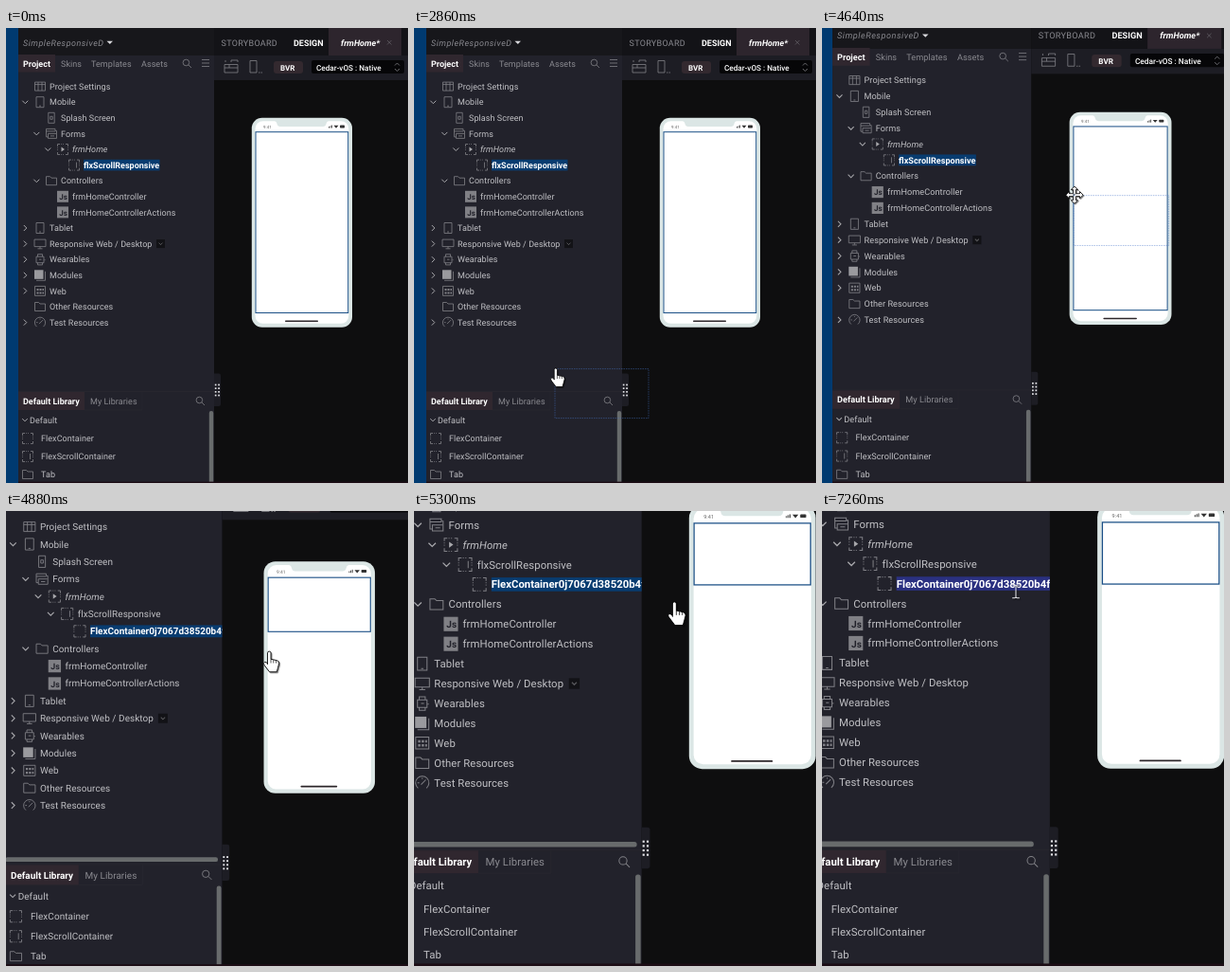
An HTML page for the animation above (8 s loop, 425 px wide and 480 px high).

```html
<!DOCTYPE html>
<html lang="en">
<head>
<meta charset="utf-8">
<title>Dragging a container onto a form</title>
<style>
html, body { margin: 0; width: 100%; height: 100%; overflow: hidden; background: #0e0e0f; }
svg { display: block; width: 425px; height: 480px; }
text { font: 9px Roboto, Arial, sans-serif; letter-spacing: .06px; fill: #c0c0c4; white-space: pre; text-rendering: geometricPrecision; }
.dim { fill: #8a8a90; }
.b { font-weight: 700; fill: #fff; letter-spacing: 0; }
.i { font-style: italic; }
.wide { letter-spacing: .3px; }
.title { letter-spacing: .5px; }
.small { font-size: 8px; }
.line { fill: none; stroke: #808086; stroke-width: .8; }
.chev { fill: none; stroke: #a8a8ac; stroke-width: 1; }
.cursor { fill: #fff; stroke: #000; stroke-width: .8; stroke-linejoin: round; }
#pointer { filter: drop-shadow(1px 1px .6px #0007); }
</style>
</head>
<body>
<svg viewBox="0 0 425 480"><g id="scene"></g></svg>
<script>
const $ = id => document.getElementById(id);
const rect = (x, y, w, h, fill, more = '') => `<rect x="${x}" y="${y}" width="${w}" height="${h}" fill="${fill}" ${more}/>`;
const path = (d, cls = 'line', more = '') => `<path d="${d}" class="${cls}" ${more}/>`;
const text = (x, y, s, cls = '', more = '') => `<text x="${x}" y="${y + 3.2}" class="${cls}" ${more}>${s}</text>`;
const group = (id, body, more = '') => `<g id="${id}" ${more}>${body}</g>`;
const at = (x, y, body) => `<g transform="translate(${x} ${y})">${body}</g>`;
const down = (x, y, r = 3) => path(`M${x - r} ${y - r / 2}l${r} ${r}l${r} ${-r}`, 'chev');
const right = (x, y) => path(`M${x - 1.5} ${y - 3}l3 3l-3 3`, 'chev');
const search = (x, y) => path(`M${x + 2} ${y + 2}l3 3M${x + 2.7} ${y - .5}a3.3 3.3 0 1 1-6.6 0a3.3 3.3 0 1 1 6.6 0`);

const dashed = path('M-5.5-3V-5.5H-3M3-5.5H5.5V-3M5.5 3V5.5H3M-3 5.5H-5.5V3')
  + path('M-2-5.5H2M-2 5.5H2M-5.5-2V2M5.5-2V2', 'line', 'stroke-dasharray="1 1" opacity=".8"');
const icons = {
  settings: path('M-5.5-4.5H5.5V4.5H-5.5ZM-2-4.5V4.5M2-4.5V4.5M-5.5-2H5.5'),
  phone: path('M-4-5.5H4V5.5H-4ZM-1 4H1'),
  splash: path('M-3.2-5.5H3.2V5.5H-3.2ZM-1.2-1.5H1.2V1.5H-1.2Z'),
  forms: path('M-5.5-5H4V-3H5.5V5H-3.5V3.5H-5.5ZM-5.5-2.5H4M-3.5 3.5V0H5M-1 2.5H3'),
  form: dashed + path('M-1.5-2.5L2 0L-1.5 2.5Z', '', 'fill="#a8a8ac"'),
  flex: dashed,
  scroll: dashed + path('M2.5-3V3'),
  folder: path('M-5.5-4.5H-1.5L0-3H5.5V4.5H-5.5Z'),
  js: rect(-6, -6, 12, 12, '#808085') + '<text x="-3.8" y="3.2" style="font:700 8px Roboto,sans-serif;fill:#22222b">Js</text>',
  desktop: path('M-6-4.5H6V3H-6ZM-2.5 5.2H2.5M0 3V5'),
  watch: path('M-4-3H4V3.5H-4ZM-2.5-3V-5.5H2.5V-3M-2.5 3.5V5.7H2.5V3.5M-1 0H1.5M5 0V1'),
  modules: rect(-6, -5.5, 9.5, 9.5, '#9a9a9e') + path('M5.5-4V5.5H-4'),
  web: path('M-5.5-5H5.5V5H-5.5Z') + path('M-3.5-1.5H4M-3.5 2H4', 'line', 'style="stroke-width:2" stroke-dasharray="2 1"'),
  gauge: path('M-3.5 4.5A5.6 5.6 0 1 1 3.5 4.5M-1 1.5L3-2.5M-4 0H-2.5M0-4V-3')
};

const newName = 'FlexContainer0j7067d38520b4f';
// level, icon, label, chevron
const rows = [
  [0, 'settings', 'Project Settings'],
  [0, 'phone', 'Mobile', down],
  [1, 'splash', 'Splash Screen'],
  [1, 'forms', 'Forms', down],
  [2, 'form', 'frmHome', down],
  [3, 'scroll', 'flxScrollResponsive'],
  [1, 'folder', 'Controllers', down],
  [2, 'js', 'frmHomeController'],
  [2, 'js', 'frmHomeControllerActions'],
  [0, 'phone', 'Tablet', right],
  [0, 'desktop', 'Responsive Web / Desktop', right],
  [0, 'watch', 'Wearables', right],
  [0, 'modules', 'Modules', right],
  [0, 'web', 'Web', right],
  [0, 'folder', 'Other Resources'],
  [0, 'gauge', 'Test Resources', right]
];
const rowsAfter = rows.slice();
rowsAfter.splice(5, 1, [3, 'scroll', 'flxScrollResponsive', down], [4, 'flex', newName]);

function tree(list, selected) {
  return list.map(([level, icon, label, chevron], i) => {
    const x = 36 + 12 * level, y = 61.6 + 16.6 * i, on = i === selected;
    return (on ? rect(x + 10, y - 5.8, label === newName ? 129 : 80.5, 11.6, '#083c70', 'class="mark"') : '')
      + (chevron ? chevron(x - 15.7, y) : '') + at(x, y, icons[icon])
      + text(x + 10, y, label, on ? 'b' : label === 'frmHome' ? 'i' : '');
  }).join('');
}
const webMenu = y => `<g class="menu">${rect(159, y - 4.5, 9, 9, '#121216')}<g opacity=".45">${down(163.5, y, 2)}</g></g>`;

const panel = rect(-20, -10, 33, 510, '#003a70') + rect(13, -10, 207, 510, '#22222b')
  + rect(13, -10, 207, 39, '#17171b')
  + text(18, 15.5, 'SimpleResponsiveD', 'dim i title') + path('M106.5 13.7H113L109.8 17Z', '', 'fill="#d8d8dc"')
  + rect(13, 28, 39, 18.5, '#30272f') + text(18, 37.5, 'Project', 'b')
  + text(58, 37.5, 'Skins', 'dim') + text(90, 37.5, 'Templates', 'dim') + text(143, 37.5, 'Assets', 'dim')
  + search(191, 37) + path('M207 33.5H215M207 37H215M207 40.5H215')
  + `<clipPath id="side"><rect x="13" y="47" width="207" height="336"/></clipPath>`
  + `<g clip-path="url(#side)"><g id="trees">`
  + group('before', tree(rows, 5) + webMenu(227.6))
  + group('after', tree(rowsAfter, 6) + webMenu(244.2)) + '</g></g>'
  + rect(13, 376.6, 203, 4.4, '#686b6c', 'id="hbar" rx="2"')
  + path('M13 383.5H220M144 384V403H83', 'line', 'style="stroke:#2a2931;stroke-width:.6"')
  + rect(13, 384, 70, 19, '#30272f') + text(18, 393.6, 'Default Library', 'b')
  + text(89, 393.6, 'My Libraries', 'dim') + search(205, 393)
  + down(20, 413.5, 2.7) + text(25, 413.5, 'Default')
  + at(23, 433, icons.flex) + text(37, 433, 'FlexContainer', '', 'id="item"')
  + at(23, 452, icons.scroll) + text(37, 452, 'FlexScrollContainer')
  + at(23, 471, icons.folder) + text(37, 471, 'Tab')
  + rect(214.8, 404, 4.4, 80, '#686b6c', 'rx="2"');

const toolbar = rect(220, -10, 230, 39, '#131317')
  + text(227.5, 15.5, 'STORYBOARD', 'dim wide') + text(304, 15.5, 'DESIGN', 'b')
  + rect(341, -10, 77, 39, '#2d252d') + text(354, 15.5, 'frmHome*', 'b i')
  + path('M403 13l4.5 4.5M407.5 13l-4.5 4.5', 'line', 'opacity=".6"')
  + rect(220, 29, 230, 26, '#1d1d24')
  + path('M231 38.5H245V47H231ZM231 42H245M236 38.5V42M238 36V34H245V36M232 36V34')
  + path('M258 34.5H265V47H258Z') + path('M267 47H272', 'line', 'stroke-dasharray="1.5 1"')
  + rect(283, 35, 31, 13, '#33292f', 'rx="3"') + text(290, 41.3, 'BVR', 'b small')
  + rect(323, 34, 98, 14, '#060608', 'rx="2"')
  + text(328, 41.3, 'Cedar-vOS : Native', 'b', 'style="font-weight:500;font-size:8.2px"')
  + path('M411 39.5l2.5-2.5 2.5 2.5M411 43l2.5 2.5 2.5-2.5');

let dots = '';
for (let i = 0; i < 8; i++) dots += rect(220.8 + i % 2 * 3.4, 375.6 + (i >> 1) * 3.7, 1.7, 1.7, '#e4e4e8');
const handle = path('M220 364.5H225Q227 364.5 227 366.5V397Q227 399 225 399H220Z', '', 'fill="#1d1d24"') + dots;

const outline = 'stroke="#1a4f86" stroke-width="1"';
const device = rect(259.8, 94.7, 106.2, 221, '#dbe6e5', 'rx="11"')
  + rect(263.6, 98.2, 98.6, 213.6, '#fff', 'rx="8"')
  + path('M284 98H341Q339 98.5 338.5 101Q338 104 335 104H290Q287 104 286.5 101Q286 98.5 284 98Z', '', 'fill="#dbe6e5"')
  + text(272, 102.8, '9:41', '', 'style="font-size:4.4px;fill:#666"')
  + path('M341.5 105.5V104M343 105.5V103.2M344.5 105.5V102.5', 'line', 'style="stroke:#333"')
  + path('M346.5 102.8H351.5L349 105.7Z', '', 'fill="#333"') + rect(353, 102.6, 5, 2.8, '#333', 'rx=".7"')
  + rect(295, 308.4, 35, 1.5, '#2c262a', 'rx=".7"')
  + rect(264, 109.7, 97.7, 190.8, 'none', outline + ' id="screen"')
  + rect(264, 110, 97.7, 51.6, 'none', outline + ' id="dropped"');

const hand = 'M-1.6 12V1.4a1.6 1.6 0 0 1 3.2 0V7.2l6 1.3q1.9.5 1.8 2.8L8.3 15.5L7.2 19.4H.3L-4.6 13q-1.4-2.300.2-3q1.4-.4 2.8 1.400z';
let arrow = '';
for (const turn of [0, 90, 180, 270]) arrow += `<path transform="rotate(${turn})" d="M-1.4-1.4V-5.5H-3.6L0-9L3.6-5.5H1.4V-1.4"/>`;
const pointers = group('hand', path(hand, 'cursor') + path('M1.6 7.2V11M4.1 8V11M6.6 8.5V11', '', 'stroke="#000" stroke-width=".6"'))
  + group('move', arrow, 'class="cursor"')
  + group('beam', path('M-3-5.5H-1Q0-5.5 0-4.5Q0-5.5 1-5.5H3M0-4.5V4.5M-3 5.5H-1Q0 5.5 0 4.5Q0 5.5 1 5.5H3', 'line', 'style="stroke:#e8e8ec"'));

$('scene').innerHTML = rect(220, 40, 230, 460, '#0e0e0f') + panel + toolbar + handle + device
  + rect(13, 478.6, 440, 2, '#1c0d15')
  + rect(-.8, .5, 99, 52, 'none', 'id="ghost" stroke="#4775c8" stroke-opacity=".65" stroke-width=".7" stroke-dasharray="1.5 1"')
  + group('pointer', pointers);

// first change, last change, number of changes
const bursts = [[930, 1720, 13], [1780, 1840, 2], [2560, 3340, 14], [3400, 4060, 12],
  [4520, 5300, 14], [5360, 5840, 9], [6620, 6800, 4], [7260, 7260, 1]];
// time, x, y of the pointer's hot spot
const route = [[880, 366, 407], [1720, 80, 432], [1840, 81, 431], [2500, 81, 431], [3340, 258, 246],
  [3640, 273.8, 202], [4060, 265, 181.3], [5100, 265, 180.5], [5780, 177, 157.6],
  [6560, 177, 157.6], [6800, 190, 167], [7200, 190, 167], [7260, 191.6, 167.8]];
const DROP = 4820, EDIT = 7260;

const ease = u => (1 - Math.cos(Math.PI * Math.min(1, Math.max(0, u)))) / 2;
const show = (id, on) => $(id).style.display = on ? '' : 'none';

function lastStep(t) {
  let step = 0;
  for (const [from, to, n] of bursts) {
    if (t < from) break;
    const gap = (to - from) / (n - 1) || 1;
    step = Math.min(to, from + Math.floor((t - from) / gap + 1e-6) * gap);
  }
  return step;
}
function pointerAt(t) {
  let i = 0;
  while (i < route.length - 2 && t >= route[i + 1][0]) i++;
  const [t0, x0, y0] = route[i], [t1, x1, y1] = route[i + 1], u = ease((t - t0) / (t1 - t0));
  return [x0 + (x1 - x0) * u, y0 + (y1 - y0) * u];
}

function draw(now) {
  const t = lastStep(now % 8000);
  const zoom = .263 * ease((t - 4508) / 846);
  $('scene').setAttribute('transform', `translate(${-140.7 * zoom} ${-483 * zoom}) scale(${1 + zoom})`);

  const [x, y] = pointerAt(t), dragging = t >= 2560 && t < DROP, dropped = t >= DROP, late = t >= 5360;
  const moving = dragging && x > 220, editing = t >= EDIT;
  for (const id of ['pointer', 'ghost']) $(id).setAttribute('transform', `translate(${x} ${y})`);
  show('pointer', t >= 930);
  show('ghost', dragging);
  show('move', moving);
  show('beam', editing);
  show('hand', !moving && !editing);

  show('before', !dropped);
  show('after', dropped);
  show('screen', !dropped);
  show('dropped', dropped);
  show('hbar', dropped);
  $('hbar').setAttribute('width', late ? 193.5 : 203);
  $('trees').setAttribute('transform', `translate(${late ? -2.4 : 0} 0)`);
  $('after').querySelector('.menu').style.display = late ? 'none' : '';
  $('after').querySelector('.mark').setAttribute('fill', editing ? '#2a3080' : '#083c70');
  $('item').setAttribute('class', t >= 1650 && t < 2560 ? 'b' : '');
  requestAnimationFrame(() => draw(performance.now() - start));
}
const start = performance.now();
draw(0);
</script>
</body>
</html>
```
